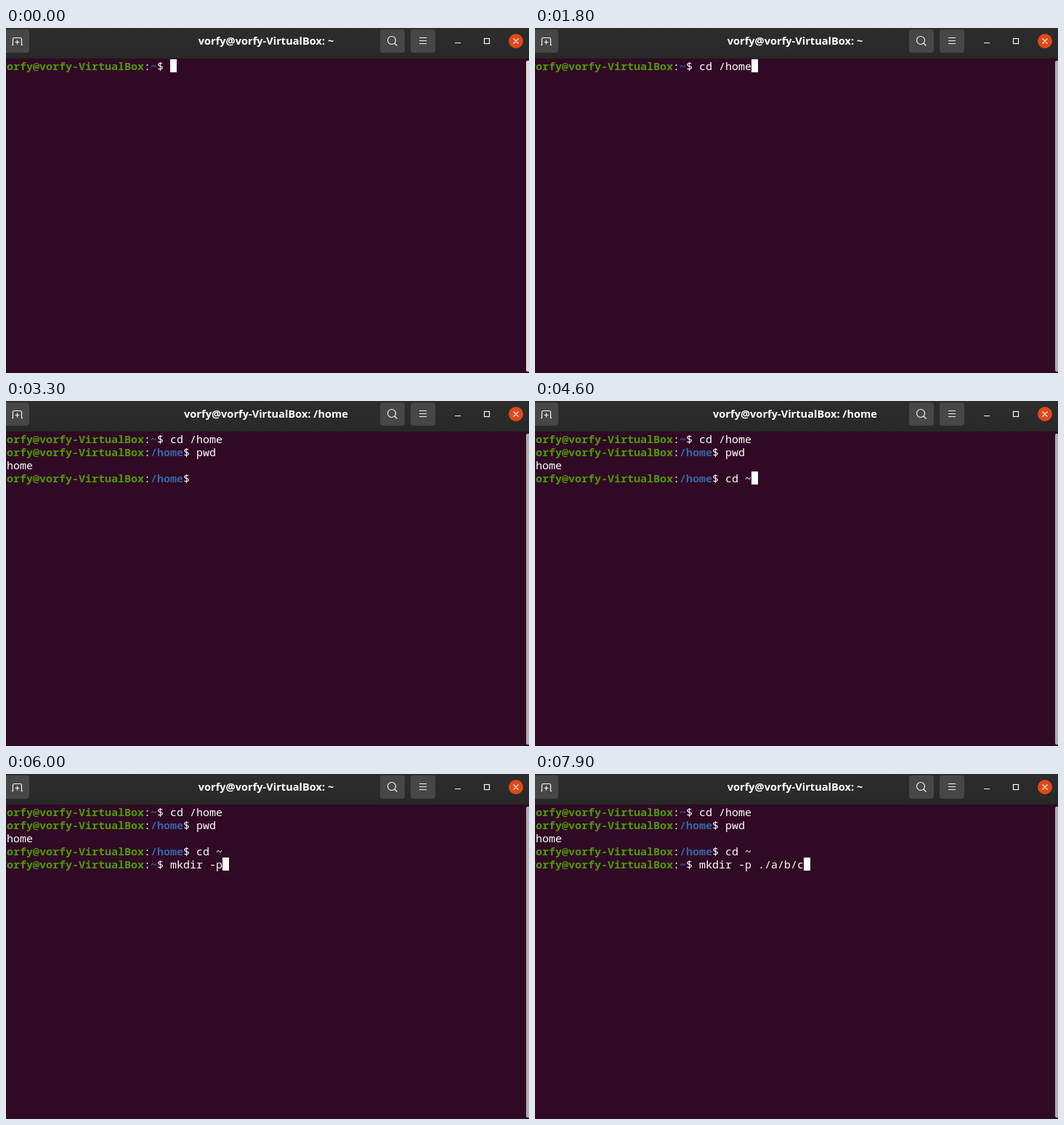
An HTML page that plays this animation: 720 px wide and 475 px high, repeating every 8 s.

```html
<!DOCTYPE html>
<html lang="en">
<head>
<meta charset="utf-8">
<title>Terminal</title>
<style>
  html, body { margin: 0; width: 100%; height: 100%; overflow: hidden; background: #300a24; }
  svg { display: block; }
  #title { font: bold 14.6px "Open Sans", "Noto Sans", sans-serif; fill: #fff; text-anchor: middle; }
  #screen { font: 15px "Noto Sans Mono", "DejaVu Sans Mono", monospace; fill: #fff; }
  #screen text { white-space: pre; }
  .user { font-weight: bold; fill: #4e9a06; }
  .path { font-weight: bold; fill: #3465a4; }
  .button { fill: #474747; }
  .icon { fill: none; stroke: #f4f4f4; stroke-width: 1.2; }
</style>
</head>
<body>
<svg width="720" height="475" viewBox="0 0 720 475">
  <defs>
    <linearGradient id="bar" x2="0" y2="1">
      <stop stop-color="#2d2d2d"/><stop offset="1" stop-color="#282828"/>
    </linearGradient>
  </defs>
  <rect width="720" height="475" fill="#300a24"/>
  <rect width="720" height="42" fill="url(#bar)"/>
  <g class="button">
    <rect x="-6" y="2" width="38" height="32" rx="4"/>
    <rect x="515" y="2" width="34" height="32" rx="4"/>
    <rect x="557" y="2" width="34" height="32" rx="4"/>
  </g>
  <circle cx="702" cy="18" r="10" fill="#e0491a"/>
  <g class="icon">
    <path d="M8 23.5H9.5V15.5Q9.5 13.5 11.5 13.5H19.5Q21.5 13.5 21.5 15.5V23.5H23M12.5 19.5H18.5M15.5 16.5V22.5"/>
    <circle cx="531" cy="17" r="5.5"/>
    <path d="M535 21L538.5 24.5M569 13.5H579M569 17.5H579M569 21.5H579M618 20.5H626M698.5 14.5L705.5 21.5M705.5 14.5L698.5 21.5"/>
    <rect x="658.5" y="14.5" width="7" height="7"/>
  </g>
  <text id="title" x="358" y="23"></text>
  <path id="scroll" d="M720 45H718Q716 45 716 47V471Q716 473 718 473H720Z"/>
  <g id="screen"></g>
  <rect id="cursor" width="9" height="18" fill="#fff"/>
</svg>
<script>
const LOOP = 8000, CELL = 9, ROW = 18, LEFT = -8, TOP = 43;
const USER = "vorfy@vorfy-VirtualBox";
const $ = id => document.getElementById(id);

// The finished rows; a row without a path is command output.
const rows = [
  { path: "~", text: "cd /home" },
  { path: "/home", text: "pwd" },
  { text: "/home" },
  { path: "/home", text: "cd ~" },
  { path: "~" }
];

// [time, active row, characters typed so far]
const typing = [
  [0, 0, ""], [900, 0, "c"], [1000, 0, "cd"], [1100, 0, "cd "],
  [1400, 0, "cd /"], [1600, 0, "cd /ho"], [1800, 0, "cd /home"],
  [2300, 1, ""], [2500, 1, "pw"], [2600, 1, "pwd"],
  [2800, 3, ""], [4100, 3, "c"], [4300, 3, "cd "], [4600, 3, "cd ~"],
  [4800, 4, ""], [5100, 4, "m"], [5200, 4, "mk"], [5400, 4, "mkdi"],
  [5500, 4, "mkdir"], [5600, 4, "mkdir "], [5700, 4, "mkdir -"],
  [6000, 4, "mkdir -p"], [6100, 4, "mkdir -p "], [6500, 4, "mkdir -p /"],
  [6800, 4, "mkdir -p "], [7000, 4, "mkdir -p ./"], [7300, 4, "mkdir -p ./a"],
  [7600, 4, "mkdir -p ./a/b"], [7700, 4, "mkdir -p ./a/b/"], [7900, 4, "mkdir -p ./a/b/c"]
];
const blinks = [[100, 600], [3300, 3900]];

function rowMarkup({ path, text }, i) {
  const prompt = path
    ? `<tspan class="user">${USER}</tspan>:<tspan class="path">${path}</tspan>$ ` : "";
  return `<text x="${LEFT}" y="${TOP + 15 + i * ROW}">${prompt}${text}</text>`;
}

let shown;
function draw(now) {
  const t = now % LOOP;
  const step = typing.findLast(s => s[0] <= t);
  if (step !== shown) {
    shown = step;
    const [, active, text] = step;
    const { path } = rows[active];
    $("screen").innerHTML = rows.slice(0, active + 1)
      .map((row, i) => rowMarkup(i === active ? { path, text } : row, i)).join("");
    $("title").textContent = `${USER}: ${path}`;
    const column = USER.length + path.length + 3 + text.length;
    $("cursor").setAttribute("x", LEFT + column * CELL);
    $("cursor").setAttribute("y", TOP + active * ROW);
  }
  const hidden = blinks.some(([from, to]) => t >= from && t < to);
  $("cursor").setAttribute("visibility", hidden ? "hidden" : "visible");
  $("scroll").setAttribute("fill", t < 100 ? "#dad8d6" : "#b2adaf");
}

let start;
function frame(now) {
  start ??= now;
  draw(now - start);
  requestAnimationFrame(frame);
}
draw(0);
requestAnimationFrame(frame);
</script>
</body>
</html>
```
